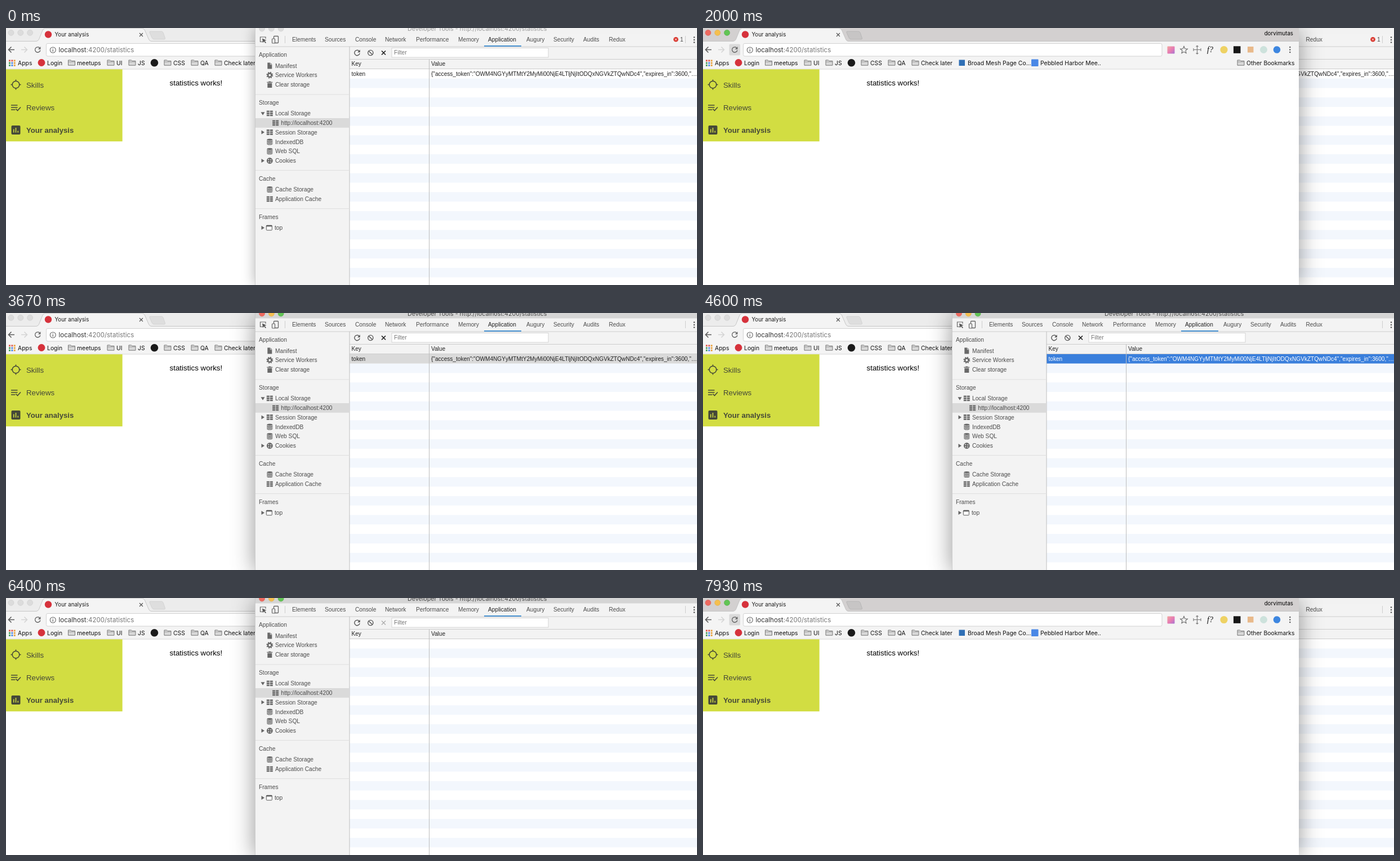
An HTML page that plays this animation: 1227 by 456 pixels, repeating every 8000 ms.

```html
<!DOCTYPE html>
<html lang="en">
<head>
<meta charset="utf-8">
<title>Local storage demo</title>
<style>
html, body { margin: 0; width: 100%; height: 100%; overflow: hidden; background: #fff; }
#stage { position: relative; width: 1227px; height: 456px; overflow: hidden; }
svg { position: absolute; top: 0; height: 456px; background: #fff; box-shadow: 0 0 22px rgba(0,0,0,.3); }
#browser { left: 0; width: 1058px; }
#tools { left: 442px; width: 785px; z-index: 1; }
.browserOn #browser { z-index: 2; }
.browserOn #browser, .toolsOn #tools { box-shadow: 0 4px 38px rgba(0,0,0,.42); }
text { white-space: pre; }
.ui { font: 400 10.4px Inter, Roboto, sans-serif; fill: #111; }
.tab { font: 400 9.7px Inter, Roboto, sans-serif; fill: #1c1c1c; }
.url { font: 400 11.5px Inter, Roboto, sans-serif; fill: #333; }
.dev { font: 10.2px "Liberation Sans", Arial, sans-serif; fill: #4c4c4c; }
.cell { font: 10.1px "Liberation Sans", Arial, sans-serif; fill: #222; }
.page { font: 13.4px "Liberation Sans", Arial, sans-serif; fill: #000; }
.menu { font: 13.3px "Liberation Sans", Arial, sans-serif; fill: #454838; }
.bold { font-weight: bold; font-size: 13.1px; }
.title { font: 10.7px Inter, Roboto, sans-serif; fill: #999; }
.toolsOn .title { fill: #444; }
.fn { font: italic 14px "Liberation Serif", "Noto Serif", serif; fill: #111; }

.strip { fill: #ececec; }
.browserOn .strip { fill: #d3d0d0; }
.plus { fill: #dedede; stroke: #cfcfcf; }
.browserOn .plus { fill: #c7c5c5; stroke: #b3b1b1; }
.bar { fill: #f2f2f2; }
.toolsOn .bar { fill: #d5d5d5; }
.light { fill: #dcdcdc; stroke: #cbcbcb; stroke-width: .6; }
.browserOn #browser .red, .toolsOn #tools .red { fill: #ee6a5f; stroke: #dc5c52; }
.browserOn #browser .amber, .toolsOn #tools .amber { fill: #f5bf4f; stroke: #dfab43; }
.browserOn #browser .green, .toolsOn #tools .green { fill: #61c454; stroke: #52ae46; }

.hot, .busy, .mark { visibility: hidden; }
.hover .hot, .loading .busy { visibility: visible; }
.loading .idle, .clean .error, .empty .entry { visibility: hidden; }
.loading .fn { fill: #8d8d8d; }
.picked .mark, .focus .mark { visibility: visible; }
.mark { fill: #dadada; }
.focus .mark { fill: #3a7fdc; }
.focus .entry .cell { fill: #fff; }
.empty .mark { visibility: hidden; }
.empty .del { stroke: #aaa; stroke-width: 1.2; }
</style>
</head>
<body>
<div id="stage"><svg id="browser" viewBox="0 0 1058 456"></svg><svg id="tools" viewBox="442 0 785 456"></svg></div>
<script>
const LOOP = 8000;
const STEPS = [
  [0, ''],
  [1130, 'hover'],
  [1600, 'browserOn hover'],
  [2400, 'browserOn clean loading'],
  [3130, 'browserOn clean'],
  [3600, 'toolsOn clean picked'],
  [3740, 'toolsOn clean focus'],
  [5930, 'toolsOn clean empty'],
  [6800, 'browserOn clean empty hover']
];

const attrs = o => Object.entries(o || {}).map(([k, v]) => ` ${k}="${v}"`).join('');
const rect = (x, y, w, h, fill, o) => `<rect x="${x}" y="${y}" width="${w}" height="${h}" fill="${fill}"${attrs(o)}/>`;
const dot = (x, y, r, fill, o) => `<circle cx="${x}" cy="${y}" r="${r}" fill="${fill}"${attrs(o)}/>`;
const line = (d, color, w = 1, o) => `<path d="${d}" fill="none" stroke="${color}" stroke-width="${w}"${attrs(o)}/>`;
const shape = (d, fill, o) => `<path d="${d}" fill="${fill}"${attrs(o)}/>`;
const text = (x, y, s, cls, o) => `<text x="${x}" y="${y}" class="${cls}"${attrs(o)}>${s}</text>`;
const group = (cls, ...parts) => `<g class="${cls}">${parts.join('')}</g>`;
const at = (x, y, s) => `<g transform="translate(${x} ${y})">${s}</g>`;
const lights = (x, y) => ['red', 'amber', 'green'].map((c, i) => dot(x + i * 16.8, y, 5, '#ddd', { class: 'light ' + c })).join('');
const more = (x, y) => [-4.4, 0, 4.4].map(d => dot(x, y + d, 1.25, '#555')).join('');
const reload = (x, y, c) => at(x, y,
  line('M3.6 -3A4.7 4.7 0 1 0 4.6 1', c, 1.4) + shape('M5.2 -5.4V-.8H.6Z', c));
const folder = x => at(x, 61.5,
  shape('M-6 -4.5H-1.5L0 -3H6V4.7H-6Z', '#d9d9d9', { stroke: '#777' }) + line('M-6 -1.4H6', '#888', .8));

const ICON = '#696969';
const icons = {
  file: shape('M-4 -5.5H1L4 -2.5V5.5H-4Z', ICON) + line('M1 -5.5V-2.2H4', '#f3f3f3', .8),
  gear: dot(0, 0, 3.2, 'none', { stroke: ICON, 'stroke-width': 2.4 }) +
    dot(0, 0, 4.9, 'none', { stroke: ICON, 'stroke-width': 2, 'stroke-dasharray': '2.1 1.75' }),
  trash: shape('M-4 -2.7H4V5.5H-4ZM-5 -4.7H-2V-5.7H2V-4.7H5V-3.5H-5Z', ICON),
  grid: [-3.5, 0, 3.5].map(y => rect(-5.5, y - 1.4, 5, 2.7, ICON) + rect(.5, y - 1.4, 5, 2.7, ICON)).join(''),
  base: shape('M-5 -3.6A5 2 0 0 1 5 -3.6V3.6A5 2 0 0 1 -5 3.6Z', ICON) +
    line('M-5 -2.6Q0 0 5 -2.6M-5 .2Q0 2.8 5 .2M-5 2.8Q0 5.2 5 2.8', '#f3f3f3', .9),
  cookie: dot(0, 0, 5.4, ICON) + [[-2, -2], [2, -1.6], [-2, 2], [1.8, 2.2]].map(p => dot(...p, 1, '#f3f3f3')).join(''),
  frame: rect(-5, -4.3, 10, 8.6, '#fff', { stroke: '#555', rx: 1 }) + rect(-5, -4.3, 10, 2, '#555')
};

function drawBrowser() {
  const INK = '#5a5a5a', MENU = '#454838', LIME = '#d2dd42';
  const tab = 'M0 23.5H54Q57 23 58.500 20L65 4Q66.500 .5 70 .5H241Q245 .5 246.500 4L253.500 20Q255 23.500 258 23.500H1058';
  const apps = ['#e2574c', '#e2574c', '#e9a13b', '#4a9f5b', '#4a86e8', '#e9a13b', '#4a9f5b', '#4a86e8', '#e9a13b'];
  const marks = [[21, 'Apps'], [73, 'Login'], [126, 'meetups'], [196, 'UI'], [234, 'JS'], [297, 'CSS'],
    [345, 'QA'], [387, 'Check later'], [470, 'Broad Mesh Page Co...'], [599, 'Pebbled Harbor Mee..'], [965, 'Other Bookmarks']];
  const chrome = [
    rect(0, 0, 1058, 24, '#ececec', { class: 'strip' }),
    shape(tab + 'V73H0Z', '#f4f4f4'), line(tab, '#bdbdbd', .8),
    shape('M256 6H276Q278 6 279 8L282.500 18Q283 20 281 20H263Q260.500 20 259.500 18L255 8Q254.500 6 256 6Z', '#ddd', { class: 'plus', 'stroke-width': .8 }),
    lights(9, 8.4),
    group('idle', dot(75, 11.5, 6.2, '#d6323c'), text(86.5, 15, 'Your analysis', 'tab')),
    group('busy', line('M75.500 6.500A5 5 0 0 1 80.500 11.500', '#3f8fd2', 1.8, { id: 'spinner' }), text(86.500, 15, 'Tarmovel', 'tab')),
    line('M237 9l6 6m0-6l-6 6', '#555', 1.2),
    group('hot', rect(46.5, 28.5, 19.5, 20, '#dadada', { rx: 2 })),
    line('M15 38.500H5M9.500 33.500L4.500 38.500L9.500 43.500', INK, 1.5),
    line('M27 38.500H37M32.500 33.500L37.500 38.500L32.500 43.500', '#d4d4d4', 1.5),
    group('idle', reload(56.3, 38.5, '#666')),
    group('busy', line('M52 34l9 9m0-9l-9 9', INK, 1.5)),
    rect(71.5, 27.5, 743.5, 22.5, '#fff', { rx: 2.5, stroke: '#d2d2d2' }),
    dot(83.3, 39, 5, 'none', { stroke: '#666', 'stroke-width': 1.1 }), line('M83.300 38V42M83.300 35.800V37', '#666', 1.2),
    text(93.5, 43, 'localhost<tspan fill="#777">:4200/statistics</tspan>', 'url'),
    rect(824.5, 32.5, 13, 13, 'url(#pink)', { rx: 1 }),
    shape('M854 32.500L855.800 36.800L860.400 37.200L856.900 40.200L858 44.700L854 42.300L850 44.700L851.100 40.200L847.600 37.200L852.200 36.800Z', 'none', { stroke: '#666', 'stroke-width': 1.1 }),
    line('M877.500 32V45.500M871 38.500H884M875.500 33L877.500 31.500L879.500 33M875.500 44.500L877.500 46L879.500 44.500M871 36V41M884 36V41', '#777', 1.1),
    text(895, 43, 'f?', 'fn', { 'font-weight': 'bold' }),
    dot(925, 38.5, 6.6, '#eed264'), rect(942, 32.3, 12.5, 12.5, '#171717'),
    rect(967, 33, 10.5, 10.5, '#e9b98a'), dot(995.5, 38.5, 6.5, '#cde2dc'), dot(1019, 38.5, 6.3, '#3d86e0'),
    more(1042.3, 38.5),
    text(1048, 12.5, 'dorvimutas', 'tab', { 'text-anchor': 'end', style: 'fill:#000' }),
    apps.map((c, i) => rect(5 + i % 3 * 4.4, 56.5 + Math.floor(i / 3) * 4.2, 2.9, 2.9, c)).join(''),
    dot(63, 61.5, 6.4, '#d6323c'), dot(263.5, 61.7, 6.8, '#1b1b1b'),
    [116.5, 186, 224, 287, 335, 377, 955].map(folder).join(''),
    rect(454.5, 56.5, 10.5, 10.5, '#2f6fb5'), rect(583, 55.5, 12.5, 12.5, '#4a88e6', { rx: 1 }),
    marks.map(([x, s]) => text(x, 65.5, s, 'ui')).join(''),
    line('M0 73H1058', '#d6d6d6')
  ];
  const body = group('idle',
    rect(0, 73.3, 206.7, 127.9, LIME),
    dot(17.5, 100.5, 6.3, 'none', { stroke: MENU, 'stroke-width': 1.6 }),
    line('M17.500 91.500V95M17.500 106V109.500M8.500 100.500H12M23 100.500H26.500', MENU, 1.6),
    line('M9 137H20.500M9 141H20.500M9 145H16.500M17.500 143.500L20.500 146.500L26 140.500', MENU, 1.6),
    rect(9.5, 173, 16, 16, MENU, { rx: 2 }),
    line('M13.700 179.500V185.500M17.500 177V185.500M21.300 182.500V185.500', LIME, 1.6),
    text(36, 105.5, 'Skills', 'menu'), text(36, 146, 'Reviews', 'menu'), text(36, 186, 'Your analysis', 'menu bold'),
    text(290.5, 102.3, 'statistics works!', 'page'));
  const pink = '<defs><linearGradient id="pink" x2="1" y2="1"><stop stop-color="#f3a59c"/><stop offset=".55" stop-color="#e57bb4"/><stop offset="1" stop-color="#a674d4"/></linearGradient></defs>';
  return pink + chrome.join('') + body;
}

function drawTools() {
  const EDGE = '#cdcdcd', ROW = 16.8, TOP = 72.8;
  const tabs = [[508, 'Elements'], [566, 'Sources'], [620, 'Console'], [673, 'Network'], [728, 'Performance'], [803, 'Memory'],
    [856, 'Application'], [924, 'Augury'], [972, 'Security'], [1025, 'Audits'], [1070.5, 'Redux']];
  const heads = [[47.5, 'Application'], [132, 'Storage'], [267, 'Cache'], [335, 'Frames']];
  const items = [[67, 'Manifest', 'file'], [83.7, 'Service Workers', 'gear'], [100.5, 'Clear storage', 'trash'],
    [151.5, 'Local Storage', 'grid'], [168.5, 'http://localhost:4200', 'grid', 10.3], [185, 'Session Storage', 'grid'],
    [202, 'IndexedDB', 'base'], [218.7, 'Web SQL', 'base'], [235.5, 'Cookies', 'cookie'],
    [286.5, 'Cache Storage', 'base'], [303.5, 'Application Cache', 'grid'], [354.5, 'top', 'frame', -1]];
  const value = '{"access_token":"OWM4NGYyMTMtY2MyMi00NjE4LTljNjItODQxNGVkZTQwNDc4","expires_in":3600,"…';
  const stripes = Array.from({ length: 12 }, (_, i) => rect(610, TOP + ROW * (2 * i + 1), 617, ROW, '#f3f7fd')).join('');
  return [
    rect(442, 0, 785, 10, '#f2f2f2', { class: 'bar' }), lights(454.5, 1),
    text(713, 5.2, 'Developer Tools - http://localhost:4200/statistics', 'title'),
    rect(442, 9.5, 785, 63, '#f3f3f3'),
    rect(442, 33, 168, 423, '#f3f3f3'),
    line('M457 24.500H451.500V16H461V19', '#666', 1.2), shape('M455 18.500L462.500 21.700L459.300 22.800L462 26L460.700 27L458 23.800L456.200 26.300Z', '#555'),
    rect(475.5, 14.5, 8, 12, 'none', { stroke: '#666', 'stroke-width': 1.3, rx: 1 }),
    rect(472.5, 19, 5, 8, '#f3f3f3', { stroke: '#666', 'stroke-width': 1.2, rx: 1 }),
    line('M495.500 14V27M1206.500 14V27', EDGE),
    tabs.map(([x, s]) => text(x, 24.3, s, 'dev', s === 'Application' ? { style: 'fill:#222' } : {})).join(''),
    line('M442 33H1227', EDGE), rect(849, 31, 66, 2, '#4690cf'),
    group('error', dot(1189.5, 20.3, 4.3, '#d8352c'), line('M1187.800 18.600l3.400 3.400m0-3.400l-3.400 3.400', '#fff', 1), text(1197, 24, '1', 'dev')),
    more(1222, 21),
    reload(623.5, 44, '#555'),
    dot(647.3, 44, 4.6, 'none', { stroke: '#555', 'stroke-width': 1.4 }), line('M644 40.700L650.600 47.300', '#555', 1.4),
    line('M667 40.500l7 7m0-7l-7 7', '#222', 1.7, { class: 'del' }),
    rect(685, 35.5, 278, 16.5, '#fff', { stroke: '#d4d4d4' }), text(689, 47.3, 'Filter', 'dev', { style: 'fill:#777' }),
    text(613.5, 67.3, 'Key', 'cell'), text(755, 67.3, 'Value', 'cell'),
    rect(610, 72.5, 617, 384, '#fff'), stripes,
    rect(610, TOP, 617, ROW, '#dadada', { class: 'mark' }),
    group('entry', text(613.5, 84.8, 'token', 'cell'), text(755, 84.8, value, 'cell')),
    line('M610 55.500H1227M610 72.500H1227', EDGE), line('M610 33V456M751.500 55.500V456', '#bdbdbd'),
    line('M442 118H609.500M442 252.500H609.500M442 320.500H609.500', '#dedede'),
    rect(442, 160, 167.5, 16.8, '#dadada'),
    heads.map(([y, s]) => text(449, y + 3.7, s, 'dev')).join(''),
    items.map(([y, s, icon, dx = 0]) => at(468.3 + dx, y, icons[icon]) + text(478 + dx, y + 3.6, s, 'dev')).join(''),
    shape('M452.500 149.300H459.500L456 154.800Z', '#666'),
    [185, 235.5, 354.5].map(y => shape(`M453.500 ${y - 3.5}L459 ${y}L453.500 ${y + 3.5}Z`, '#666')).join(''),
    line('M442.500 0V456', '#c4c4c4', .8)
  ].join('');
}

const stage = document.getElementById('stage');
document.getElementById('browser').innerHTML = drawBrowser();
document.getElementById('tools').innerHTML = drawTools();
const spinner = document.getElementById('spinner');
const start = performance.now();

function tick() {
  const t = (performance.now() - start) % LOOP;
  const state = STEPS.filter(s => s[0] <= t).pop()[1];
  if (stage.className !== state) stage.className = state;
  spinner.setAttribute('transform', `rotate(${(t - 2800) * .36} 75.5 11.5)`);
  requestAnimationFrame(tick);
}
tick();
</script>
</body>
</html>
```
